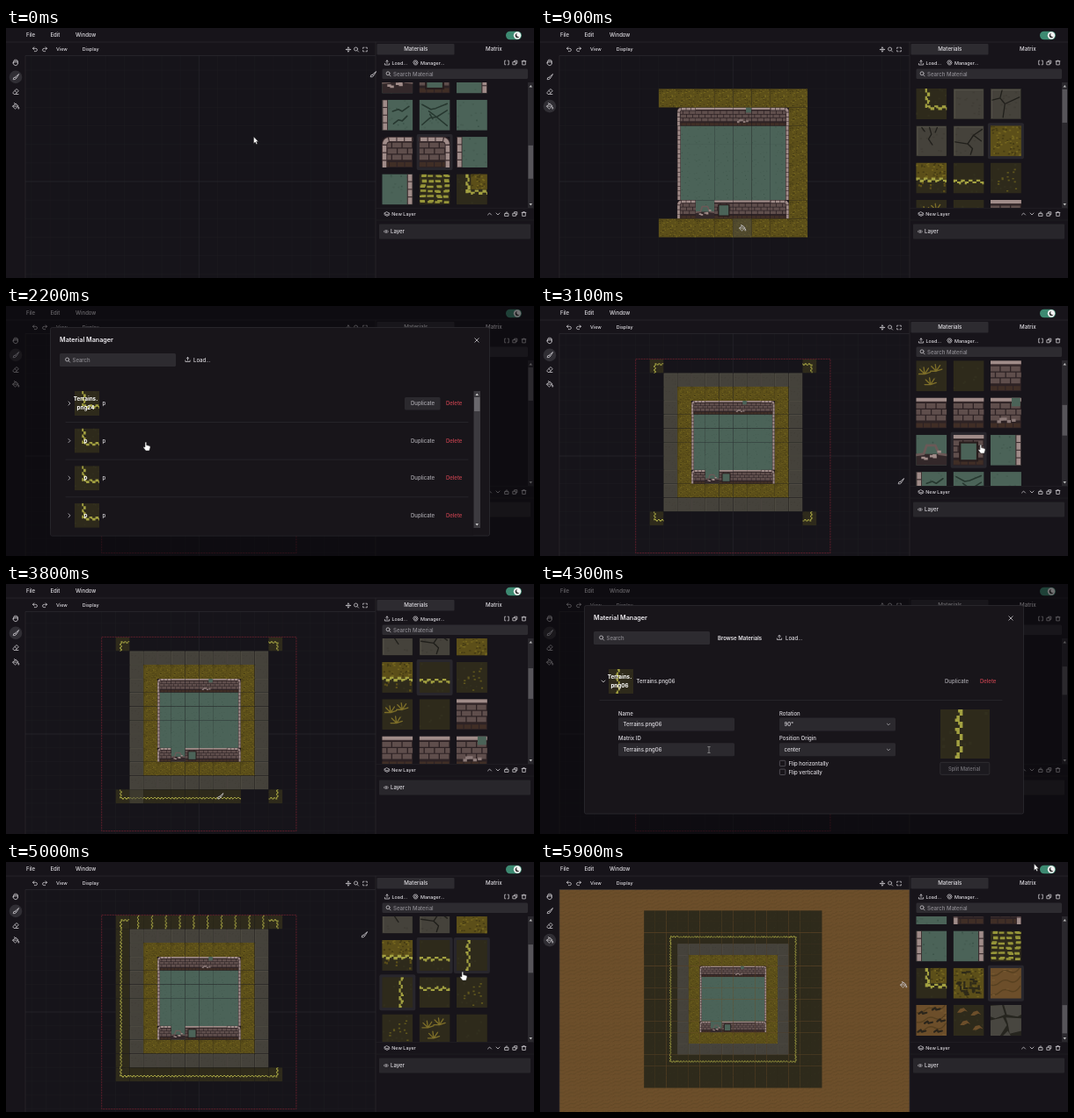
An HTML page for the animation above (6 s loop, 600 by 285 pixels).

```html
<!DOCTYPE html>
<html lang="en">
<head>
<meta charset="utf-8">
<title>Tile map editor</title>
<style>
html,body{margin:0;width:100%;height:100%;overflow:hidden;background:#17141a}
svg{display:block;width:100%;height:100%}
text{font-family:Inter,"Open Sans",sans-serif;white-space:pre}
</style>
</head>
<body>
<svg id="stage" viewBox="0 0 600 285">
  <defs id="defs"></defs>
  <g id="board"></g>
  <g id="chrome"></g>
  <g id="live"></g>
</svg>
<script>
const $ = id => document.getElementById(id);
let seed = 7;
const rnd = () => (seed = (seed * 16807) % 2147483647) / 2147483647;

const box = (x, y, w, h, fill, more = '') =>
  `<rect x="${x}" y="${y}" width="${w}" height="${h}" fill="${fill}" ${more}/>`;
const line = (d, col = '#c9c7cc', w = .8) =>
  `<path d="${d}" fill="none" stroke="${col}" stroke-width="${w}" stroke-linecap="round" stroke-linejoin="round"/>`;
const label = (x, y, s, size = 6, fill = '#dddbe0', weight = 500) =>
  `<text x="${x}" y="${y}" font-size="${size}" fill="${fill}" font-weight="${weight}">${s}</text>`;

// ---- tiles, drawn on a 32 unit square ----
function dots(n, col, w, h, x0 = 0, y0 = 0, x1 = 32, y1 = 32) {
  let d = '';
  for (let i = 0; i < n; i++) {
    const x = x0 + rnd() * (x1 - x0 - w), y = y0 + rnd() * (y1 - y0 - h);
    d += `M${x.toFixed(1)} ${y.toFixed(1)}h${w}v${h}h${-w}z`;
  }
  return `<path d="${d}" fill="${col}"/>`;
}
// two staggered rows of leaf blocks
function strip(from, to, at, upright) {
  let d = '';
  for (let p = from, i = 0; p < to; p += 2, i++) {
    const q = at + (i % 4 < 2 ? -2.5 : -.5), h = 2 + Math.floor(rnd() * 2);
    d += upright ? `M${q} ${p}h${h}v2h${-h}z` : `M${p} ${q}h2v${h}h-2z`;
  }
  return `<path d="${d}" fill="#a3a141"/>`;
}
function bricks() {
  let d = '', low = '';
  for (let r = 0; r < 3; r++)
    for (let x = r % 2 ? -5 : 0; x < 32; x += 10.7) {
      const a = Math.max(0, x), b = Math.min(32, x + 9.5);
      d += `M${a} ${6 + r * 6.3}H${b}v5.2H${a}z`;
    }
  for (let x = 0; x < 32; x += 8) low += `M${x} 26.5h7v4.5h-7z`;
  return box(0, 0, 32, 32, '#2d2224') + `<path d="${d}" fill="#5f4e4c"/>` + `<path d="${low}" fill="#402e26"/>`;
}
const PINK = '#a08c89', CRACK = '#201f1b', FLOOR = '#4b6358', EARTH = '#6c4e2a';
const plain = () => box(0, 0, 32, 32, '#2e2a1b') + dots(8, '#322f1e', 2, 2);
const stone = () => box(0, 0, 32, 32, '#2f2d28') + box(.8, .8, 30.4, 30.4, '#545148') +
  box(2, 2, 29.2, 29.2, '#45423b') + dots(14, '#403d36', 2, 1.5, 2, 2, 30, 30);
const grassBits = (n, ...area) => dots(n, '#74661f', 2, 1.5, ...area) + dots(n, '#463c14', 2, 1.5, ...area);
const grass = () => box(0, 0, 32, 32, '#5c4f19') + grassBits(34);
const green = () => box(0, 0, 32, 32, FLOOR) + dots(10, '#465d52', 2, 1.5) + dots(3, '#3b5348', 1.5, 1.5);
const wall = () => bricks() + box(0, 0, 32, 4, PINK) + box(0, 4, 32, 1, '#3a2c2e');
const side = x => box(x, 0, 6, 32, '#3a2c2e') + [0, 8, 16, 24].map(y => box(x + 1, y + .5, 4.2, 7, PINK)).join('');
const bend = '<path d="M0 0H9Q1 1 0 9z" fill="#17141a"/>' + line('M2.5 34V9Q2.5 2.5 9 2.5H34', '#3a2c2e', 6) +
  '<path d="M2.5 32V9Q2.5 2.5 9 2.5H32" fill="none" stroke="#a08c89" stroke-width="4" stroke-dasharray="7 1"/>';
const brown = () => box(0, 0, 32, 32, EARTH) +
  [4, 14, 24].map(y => line(`M1 ${y + 4}q5 1 9 -3t10 -1t11 -5`, '#574020', 1.3)).join('') +
  dots(8, '#775930', 3, 1);

const tiles = {
  plain: plain(),
  stone: stone(),
  crackA: stone() + line('M2 12L10 10L15 16L30 9M15 16L13 30M10 10L12 2', CRACK, 1.2),
  crackB: stone() + line('M14 2L16 9L13 14L17 20M6 2L9 6M22 2L20 7', CRACK, 1.2),
  crackC: stone() + line('M30 4L21 10L15 19L2 17M15 19L20 24L18 30M21 10L29 16', CRACK, 1.3),
  grass: grass(),
  edge: plain() + box(0, 0, 32, 17, '#5c4f19') + grassBits(20, 0, 0, 32, 17) + strip(0, 32, 18) + dots(8, '#5c4f19', 2, 2, 0, 20, 32, 32),
  band: plain() + strip(0, 32, 20),
  corner: plain() + strip(0, 20, 12, true) + strip(11, 32, 20),
  leaf: plain() + dots(13, '#5e551d', 2, 1.5),
  tufts: plain() + [[9, 14], [21, 11], [15, 25]].map(([x, y]) =>
    line(`M${x} ${y}l-5 -5M${x} ${y}l-1 -7M${x} ${y}l4 -6M${x} ${y}l6 -2M${x} ${y}l-6 0`, '#7d6e28', 1.2)).join(''),
  wall: wall(),
  wallG: wall() + box(22, 0, 9, 9, FLOOR) + dots(6, '#8c7a78', 4, 3, 2, 20, 30, 31),
  rubble: green() + box(0, 20, 32, 12, '#33282a') + line('M0 21L8 20L11 11H20L24 20L32 21', '#6b5957', 2.5) +
    dots(6, PINK, 4, 2.5, 5, 12, 27, 29),
  door: bricks() + box(0, 0, 32, 4, PINK) + box(6, 7, 20, 21, '#271c1c') + box(8, 9, 16, 17, FLOOR),
  gl: green() + side(0),
  gr: green() + side(26),
  glCrack: green() + side(0) + line('M11 12l6 -2l4 2l7 -5M12 25l5 -4l4 1l5 -5', '#26372f', 1.5),
  gCrack: green() + line('M3 5l9 5l5 -1l12 -5M3 26l8 -7l7 -1l11 -7M10 12l8 6l11 9M14 20l-3 -5', '#26372f', 1.4),
  green: green(),
  tl: bricks() + bend,
  tr: bricks() + `<g transform="matrix(-1 0 0 1 32 0)">${bend}</g>`,
  stripes: plain() + [0, 1, 2, 3, 4, 5].map(i =>
    [0, 1, 2, 3].map(j => dots(2, '#969539', 5, 2.2, j * 8, i * 5.4, j * 8 + 8, i * 5.4 + 3.8)).join('')).join(''),
  grassCorner: plain() + box(15, 0, 17, 16, '#5c4f19') + grassBits(13, 15, 0, 32, 16) + strip(0, 20, 12, true) + strip(11, 32, 19),
  bush: grass() + dots(14, '#2e2a18', 5, 2, 3, 3, 29, 29) + dots(10, '#2e2a18', 2, 5, 3, 3, 29, 29),
  brown: brown(),
  brownCrack: brown() + [[6, 9], [20, 5], [12, 19], [25, 17], [5, 28], [22, 28]].map(([x, y]) =>
    line(`M${x - 3} ${y}l3 -2l1 2l4 -1`, '#2b251b', 2)).join(''),
  brownTuft: plain() + [[4, 8], [18, 11], [7, 21], [20, 26]].map(([x, y]) =>
    `<path d="M${x} ${y}l3 -4l4 -1l4 4l-3 -1l-4 2z" fill="${EARTH}"/>`).join(''),
  stones: box(0, 0, 32, 32, '#26251f') +
    '<path d="M0 1L12 0L15 10L5 14L0 12zM14 0H32V10L28 12L17 10zM0 16L13 13L17 21L10 32H0zM16 13L32 14V27L20 30L18 19zM13 32L18 27L21 32z" fill="#484640"/>'
};

// ---- icons, centred on 0,0 ----
const icons = {
  hand: line('M-2.5 .5V-1.5M-1.2 0V-3M0 -.2V-3.3M1.3 0V-2.8M2.5 1V-1.6M2.5 1Q2 3.5 0 3.5Q-2 3.5 -3.3 .4L-2.4 .3'),
  brush: line('M3.2 -3.2L-.6 .2L.7 1.4L3.4 -2.8zM-.6 .2Q-3 0 -2.8 2.8Q0 3.4 .7 1.4'),
  eraser: line('M-3 1L1 -3L3.4 -.8L-.6 3H-1.6zM-1 -1L1.4 1.2M0 3H3'),
  bucket: line('M-3.2 0L0 -3.2L3 -.2L-.2 2.8zM-3.2 0H2.6M-1.5 -3.6L0 -1.6M3.3 1.2Q4.3 3 3.3 3.2Q2.4 3 3.3 1.2'),
  undo: line('M-1 -2.4L-2.6 -1L-1 .5M-2.6 -1H.6Q2.5 -1 2.5 .8Q2.4 2.3 .5 2.3H-.6'),
  move: line('M0 -2.6V2.6M-2.6 0H2.6M-.6 -2L0 -2.6L.6 -2M-.6 2L0 2.6L.6 2M-2 -.6L-2.6 0L-2 .6M2 -.6L2.6 0L2 .6'),
  lens: line('M1.2 1.2L2.6 2.6M1.6 -.5A2 2 0 1 1 -2.4 -.5A2 2 0 1 1 1.6 -.5'),
  full: line('M-2.3 -1V-2.3H-1M1 -2.3H2.3V-1M2.3 1V2.3H1M-1 2.3H-2.3V1'),
  load: line('M-2.6 1V2.5H2.6V1M0 1V-2.6M-1.3 -1.3L0 -2.6L1.3 -1.3'),
  gear: line('M1.1 0A1.1 1.1 0 1 1 -1.1 0A1.1 1.1 0 1 1 1.1 0M-1.2 -2.4H1.2L2.6 0L1.2 2.4H-1.2L-2.6 0z'),
  brackets: line('M-1.2 -2.3H-2.3V2.3H-1.2M1.2 -2.3H2.3V2.3H1.2'),
  copy: line('M-2.3 -.8H.8V2.3H-2.3zM-.8 -.8V-2.3H2.3V.8H.8'),
  bin: line('M-2.4 -1.6H2.4M-1.8 -1.6V2.4H1.8V-1.6M-.8 -1.6V-2.4H.8V-1.6'),
  lock: line('M-2 -.4H2V2.4H-2zM-1.2 -.4V-1.4Q0 -3.2 1.2 -1.4'),
  up: line('M-2 1L0 -1L2 1'),
  down: line('M-2 -1L0 1L2 -1'),
  right: line('M-1 -2L1 0L-1 2'),
  layers: line('M0 -2.2L3 -.6L0 1L-3 -.6zM-3 .8L0 2.4L3 .8'),
  eye: line('M-2.6 0Q0 -3 2.6 0Q0 3 -2.6 0M.6 0A.6 .6 0 1 1 -.6 0A.6 .6 0 1 1 .6 0', '#c9c7cc', .6),
  close: line('M-2.2 -2.2L2.2 2.2M2.2 -2.2L-2.2 2.2')
};
const icon = (name, x, y, more = '') => `<g transform="translate(${x} ${y}) ${more}">${icons[name]}</g>`;
const tile = (name, x, y, size, rot = 0) =>
  `<use href="#t-${name}" transform="translate(${x} ${y}) scale(${size / 32}) rotate(${rot} 16 16)"/>`;

// ---- timeline, counted in ticks of 100 ms ----
const TICK = 100, LOOP = 60;

// first tick, last tick, tile, column, row, width, height, turn
const strokes = [
  [1, 1, 'tl', 2, 2, 1, 1], [1, 2, 'wall', 3, 2, 4, 1], [2, 2, 'tr', 7, 2, 1, 1],
  [2, 3, 'gr', 7, 3, 1, 4], [3, 4, 'gl', 2, 3, 1, 4], [4, 4, 'tl', 2, 7, 1, 1],
  [4, 5, 'wall', 3, 7, 4, 1], [5, 5, 'tr', 7, 7, 1, 1], [5, 5, 'rubble', 3, 7, 1, 1],
  [6, 6, 'door', 4, 7, 1, 1], [6, 6, 'wallG', 5, 2, 1, 1], [7, 7, 'green', 3, 3, 4, 4],
  [8, 8, 'grass', 1, 1, 8, 1], [8, 9, 'grass', 8, 2, 1, 7], [9, 9, 'grass', 1, 8, 7, 1], [10, 10, 'grass', 1, 2, 1, 6],
  [11, 12, 'stone', 0, 1, 1, 10], [12, 14, 'stone', 1, 9, 9, 2], [14, 15, 'stone', 9, 1, 1, 8],
  [17, 17, 'stone', 0, 0, 10, 1], [18, 18, '', 0, 10, 10, 1],
  [29, 29, 'corner', -1, -1, 1, 1, 90], [29, 29, 'corner', 10, -1, 1, 1, 180],
  [30, 30, 'corner', 10, 10, 1, 1, 270], [30, 30, 'corner', -1, 10, 1, 1],
  [36, 39, 'band', 0, 10, 10, 1], [48, 48, 'band', -1, 0, 1, 10, 90], [49, 49, 'band', 0, -1, 10, 1, 270],
  [51, 51, 'band', 10, 0, 1, 10, 270], [52, 52, 'band', 0, -1, 10, 1, 180],
  [53, 53, 'plain', -3, -3, 16, 2], [53, 54, 'plain', 11, -1, 2, 12],
  [54, 54, 'plain', -3, 11, 16, 2], [54, 54, 'plain', -3, -1, 2, 12]
];
// tick, x, y, pointer kind, resting place of the tool mark
const moves = [
  [0, 282, 127, 'arrow', 417, 53], [1, 165, 100, 'tool'], [2, 272, 100, 'tool'], [3, 270, 170, 'tool'],
  [4, 165, 205, 'tool'], [6, 230, 206, 'tool'], [7, 230, 165, 'tool'], [8, 290, 80, 'tool'], [9, 230, 228, 'tool'],
  [10, 145, 120, 'tool'], [11, 123, 90, 'tool'], [12, 123, 270, 'tool'], [14, 310, 270, 'tool'], [15, 314, 90, 'tool'],
  [16, 116, 54, 'tool'], [17, 312, 58, 'tool'], [18, 220, 270, 'tool'], [19, 480, 40, 'hand', 415, 60],
  [21, 300, 110, 'arrow', 415, 60], [22, 160, 160, 'hand', 415, 60], [24, 74, 113, 'hand', 415, 60],
  [26, 335, 160, 'hand', 415, 60], [28, 534, 39, 'hand', 415, 60], [29, 132, 68, 'tool'], [30, 306, 242, 'tool'],
  [31, 502, 163, 'hand', 410, 200], [35, 486, 110, 'hand', 410, 200], [36, 150, 242, 'tool'], [39, 290, 242, 'tool'],
  [40, 482, 40, 'hand', 414, 70], [41, 300, 120, 'arrow', 414, 70], [43, 192, 189, 'text', 414, 70],
  [45, 330, 160, 'hand', 414, 70], [47, 534, 39, 'hand', 414, 70], [48, 132, 200, 'tool'], [49, 290, 68, 'tool'],
  [50, 520, 130, 'hand', 407, 83], [51, 306, 190, 'tool'], [52, 200, 68, 'tool'], [53, 200, 62, 'tool'],
  [54, 140, 240, 'tool'], [55, 70, 90, 'tool'], [56, 413, 140, 'tool'], [57, 520, 120, 'hand', 413, 140],
  [58, 552, 50, 'arrow', 413, 140], [59, 562, 5, 'arrow', 413, 140]
];
const scrolls = [[0, 241], [6, 241], [8, 0], [30, 0], [31, 176], [33, 176], [35, 107], [52, 107], [54, 413.6]];
const picks = [[0, [22]], [8, [5]], [11, [1]], [29, [0]], [31, [19]], [34, [10]], [50, [10, 11, 12]], [54, [35]]];
const views = [[0, 21.15, 175], [18, 18.3, 173], [19, 15.8, 171], [53, 12.65, 169]];
const tools = [[0, 'brush'], [7, 'bucket'], [19, 'brush'], [54, 'bucket']];

const last = (rows, k) => rows.filter(r => r[0] <= k).pop();
function between(rows, k, i) {
  const a = last(rows, k), b = rows.find(r => r[0] > k);
  return b ? a[i] + (b[i] - a[i]) * (k - a[0]) / (b[0] - a[0]) : a[i];
}

const base = ('corner stone crackA crackB crackC grass edge band leaf tufts plain wall wall wall wallG rubble door gr ' +
  'glCrack gCrack green tl tr gl gr stripes grassCorner bush brown brownCrack brownTuft stones')
  .split(' ').map(n => [n, 0]);
const turned = (name, list) => list.map(r => [name, r]);
function materials(k) {
  const all = base.slice();
  if (k >= 42) all.splice(8, 0, ...turned('band', [90, 270, 180]), ['leaf', 0]);
  if (k >= 29) all.splice(1, 0, ...turned('corner', [90, 180, 270]));
  return all;
}

// ---- parts of the picture ----
function board(k) {
  const [, s, oy] = last(views, k), ox = 219.3;
  const px = c => ox + (c - 5) * s, py = r => oy + (r - 6) * s;
  let out = box(22, 31, 398, 254, '#16141a'), grid = '';
  for (let x = ox % s; x < 420; x += s) if (x > 22) grid += `M${x} 31V285`;
  for (let y = oy % s; y < 285; y += s) if (y > 31) grid += `M22 ${y}H420`;
  out += line(grid, '#1d1b21', .6) + line(`M${ox} 31V285M22 ${oy}H420`, '#28262c', .7);
  if (k >= 55) out += `<pattern id="soil" width="${s}" height="${s}" patternUnits="userSpaceOnUse" x="${ox}" y="${oy}">` +
    tile('brown', 0, 0, s) + '</pattern>' + box(22, 31, 398, 254, 'url(#soil)');

  const cells = new Map();
  for (const [a, b, name, c, r, w, h, rot = 0] of strokes) {
    if (k < a) continue;
    const n = Math.min(w * h, Math.ceil(w * h * (k - a + 1) / (b - a + 1)));
    for (let i = 0; i < n; i++) cells.set([c + i % w, r + Math.floor(i / w)].join(), [name, rot]);
  }
  for (const [key, [name, rot]] of cells) {
    const [c, r] = key.split(',');
    if (name) out += tile(name, px(c), py(r), s * 1.012, rot);
  }
  const red = 'stroke="#7c2030" stroke-width=".7"';
  if (k >= 11 && k < 19) out += box(px(0), py(1), s * 10, s * 10, 'none', red);
  if (k >= 19 && k < 53) out += box(px(-2), py(-1), s * 14, s * 14, 'none', red + ' stroke-dasharray="2 1"');
  const m = last(moves, k);
  if (m[3] === 'tool' && k < 55) {
    const c = Math.floor((m[1] - ox) / s), r = Math.floor((m[2] - oy) / s);
    out += box(ox + c * s, oy + r * s, s, s, '#4a483f', 'opacity=".55"');
  }
  return `<g clip-path="url(#canvas)">${out}</g>`;
}

function shelf(k) {
  const all = materials(k), top = between(scrolls, k, 1), marked = last(picks, k)[1];
  let out = '';
  all.forEach(([name, rot], i) => {
    const x = 427.3 + i % 3 * 42.3, y = 69 + Math.floor(i / 3) * 42.3 - top;
    if (y < 20 || y > 206) return;
    if (marked.includes(i)) out += box(x - 3, y - 3, 41, 41, '#28262c', 'rx="2"');
    out += tile(name, x, y, 35, rot);
  });
  const full = 14 + Math.ceil(all.length / 3) * 42.3, len = 127 * 143 / full;
  const bar = 70 + (127 - len) * Math.min(1, top / (full - 143));
  return `<g clip-path="url(#shelf)">${out}</g>` + box(593, 62, 6.5, 143, '#2b292e') + box(593.5, bar, 5.5, len, '#57555a') +
    '<path d="M594.5 67.5L596.3 65L598 67.5zM594.5 200L596.3 202.5L598 200z" fill="#bbb"/>';
}

const field = (x, y, s) => box(x, y, 132, 15, '#2b292e', 'rx="1.5"') + label(x + 5.5, y + 9.7, s);
function row(y, name, words, arrow, kind, rot) {
  return icon(arrow, 72, y) + tile(kind, 78, y - 14, 28, rot) +
    words.map((w, i) => `<text x="90.5" y="${y + 2.2 + (i - (words.length - 1) / 2) * 9.5}" font-size="6.3" font-weight="700" fill="#fff" text-anchor="middle">${w}</text>`).join('') +
    label(109.5, y + 2.2, name) + label(460, y + 2.2, 'Duplicate', 6, '#a9a7ad') + label(500, y + 2.2, 'Delete', 6, '#c4414e') +
    line(`M68 ${y + 21.5}H525`, '#2c2a30', .7);
}
function dialog(k) {
  const second = k >= 41, detail = second ? k >= 42 : k >= 25;
  const id = second ? 'png06' : 'png24', kind = second ? 'band' : 'corner', title = ['Terrains.', id];
  let out = box(0, 0, 600, 285, '#08070a', 'opacity=".55"') +
    box(50.5, 24.5, 499, 237.5, '#18151a', 'rx="2" stroke="#2d2b30" stroke-width=".8"') +
    label(61, 41, 'Material Manager', 7.2, '#f0eef2', 600) + icon('close', 535, 39) +
    box(61, 54, 132, 15, '#2d2b30', 'rx="1.5"') + icon('lens', 70, 61.5) + label(75.5, 63.7, 'Search', 6, '#8d8b91');
  if (detail) out += label(202, 63.7, 'Browse Materials', 6, '#eceaee', 600) + icon('load', 272, 61) + label(279, 63.7, 'Load...');
  else out += icon('load', 206.5, 61) + label(213, 63.7, 'Load...');

  if (!detail) {
    out += box(453, 104, 40.5, 14.5, '#2b292e', 'rx="1.5"');
    for (let i = 0; i < 4; i++) out += row(111 + i * 42.6, 'p', i ? ['p'] : title, 'right', kind, 0);
    return out + box(50.8, 254, 480, 7.5, '#18151a') + box(531.5, 97, 7.5, 156, '#3c3a3f') + box(532, 104, 6.5, 16, '#6a686d') +
      '<path d="M533.5 102L535.2 99.6L537 102zM533.5 248L535.2 250.4L537 248z" fill="#ccc"/>';
  }
  const rot = second || k >= 27 ? 90 : 0, name = title.join('');
  out += row(111, name, title, 'down', kind, rot) +
    label(89, 150, 'Name') + field(89, 152.5, name) + label(89, 178.2, 'Matrix ID') + field(89, 181.3, name) +
    label(272, 150, 'Rotation') + field(272, 152.5, rot + '°') + label(272, 178.2, 'Position Origin') + field(272, 181.3, 'center') +
    icon('down', 396, 160, 'scale(.8)') + icon('down', 396, 189, 'scale(.8)');
  ['Flip horizontally', 'Flip vertically'].forEach((s, i) => {
    out += box(272.4, 201.3 + i * 9.8, 6.4, 6.4, 'none', 'stroke="#66646a" stroke-width=".7" rx="1"') + label(282.5, 206.8 + i * 9.8, s);
  });
  return out + tile(kind, 455, 143, 56, rot) + box(454.8, 203.3, 56, 14, '#1c1a1f', 'rx="1.5" stroke="#39373c" stroke-width=".7"') +
    label(464, 212.5, 'Split Material', 5.8, '#77757b');
}

const pointers = {
  arrow: '<path d="M-.5 -3V4.5L1.2 3L2.5 5.6L3.7 5L2.5 2.5H4.7z" fill="#fff" stroke="#222" stroke-width=".4"/>',
  hand: '<path d="M-2 -4.5Q-1 -5.6 -.3 -4.5V-1.4L3.2 -.6Q4.2 0 3.9 1.6L2.8 5H-1.2L-4 1.2Q-3.4 0 -2 1z" fill="#fff" stroke="#222" stroke-width=".5"/>',
  text: line('M-1.3 -3.4H1.3M0 -3.4V3.4M-1.3 3.4H1.3', '#aaa', .6)
};
function pointer(k) {
  const [, , , kind, rx, ry] = last(moves, k), tool = last(tools, k)[1];
  const x = between(moves, k, 1), y = between(moves, k, 2);
  if (kind === 'tool') return ['', icon(tool, x, y)];
  return [icon(tool, rx, ry), `<g transform="translate(${x} ${y})">${pointers[kind]}</g>`];
}

function chrome() {
  const small = (x, y, s) => label(x, y, s, 5.4);
  return '<path d="M0 0H600V285H420V31H22V285H0z" fill="#17141a"/>' +
    line('M22 285V31.5H420V285M0 16H600M420 16V31', '#2c2a30', .7) +
    label(23, 10, 'File') + label(50.5, 10, 'Edit') + label(79, 10, 'Window') +
    box(568, 3.7, 18, 9.6, '#3d8a72', 'rx="4.8"') + '<circle cx="581" cy="8.5" r="4.2" fill="#f2f2f2"/>' +
    '<path d="M581 6A2.6 2.6 0 1 0 583.5 9.8A2.3 2.3 0 0 1 581 6z" fill="#333"/>' +
    icon('undo', 33, 24.3) + icon('undo', 44, 24.3, 'scale(-1 1)') + small(57, 26.3, 'View') + small(86.7, 26.3, 'Display') +
    icon('move', 389, 24.5) + icon('lens', 398, 24.5) + icon('full', 408, 24.5) +
    box(421.5, 18, 88, 12.5, '#2d2b30', 'rx="1"') + label(452.2, 26.3, 'Materials', 6.2) + label(545, 26.3, 'Matrix', 6.2) +
    icon('load', 433, 39.5) + small(438.5, 41.5, 'Load...') + icon('gear', 465.5, 39.5) + small(471, 41.5, 'Manager...') +
    icon('brackets', 569, 39.5) + icon('copy', 578.5, 39.5) + icon('bin', 588.5, 39.5) +
    box(427.5, 46.5, 165.5, 11.5, '#2d2b30', 'rx="1.5"') + icon('lens', 434.5, 52.3) + label(440, 54.5, 'Search Material', 6.1, '#8d8b91') +
    line('M421 205.5H600M421 219H600', '#242228', .6) + icon('layers', 433, 212) + small(438.3, 214.2, 'New Layer') +
    icon('up', 549.5, 212) + icon('down', 559, 212) + icon('lock', 569, 212) + icon('copy', 578.5, 212) + icon('bin', 588.5, 212) +
    box(424, 223.5, 172, 17, '#28262b', 'rx="1"') + icon('eye', 432, 232) + label(437, 234.2, 'Layer');
}

function toolbar(k) {
  const active = last(tools, k)[1];
  return ['hand', 'brush', 'eraser', 'bucket'].map((name, i) => {
    const y = 39.3 + i * 16.6;
    return (name === active ? `<circle cx="11" cy="${y}" r="7.3" fill="#302e34"/>` : '') + icon(name, 11, y);
  }).join('');
}

$('defs').innerHTML = Object.entries(tiles).map(([n, s]) => `<g id="t-${n}" clip-path="url(#square)">${s}</g>`).join('') +
  '<clipPath id="square"><path d="M0 0H32V32H0z"/></clipPath>' +
  '<clipPath id="canvas"><path d="M22 31H420V285H22z"/></clipPath><clipPath id="shelf"><path d="M421 62H592V205H421z"/></clipPath>';
$('chrome').innerHTML = chrome();

let shown = -1;
function draw(now) {
  const k = Math.floor(now / TICK) % LOOP;
  if (k !== shown) {
    shown = k;
    const modal = (k >= 20 && k < 29) || (k >= 41 && k < 48), [mark, arrow] = pointer(k);
    $('board').innerHTML = board(k);
    $('live').innerHTML = toolbar(k) + shelf(k) + mark + (modal ? dialog(k) : '') + arrow;
  }
  requestAnimationFrame(draw);
}
draw(performance.now());
</script>
</body>
</html>
```
